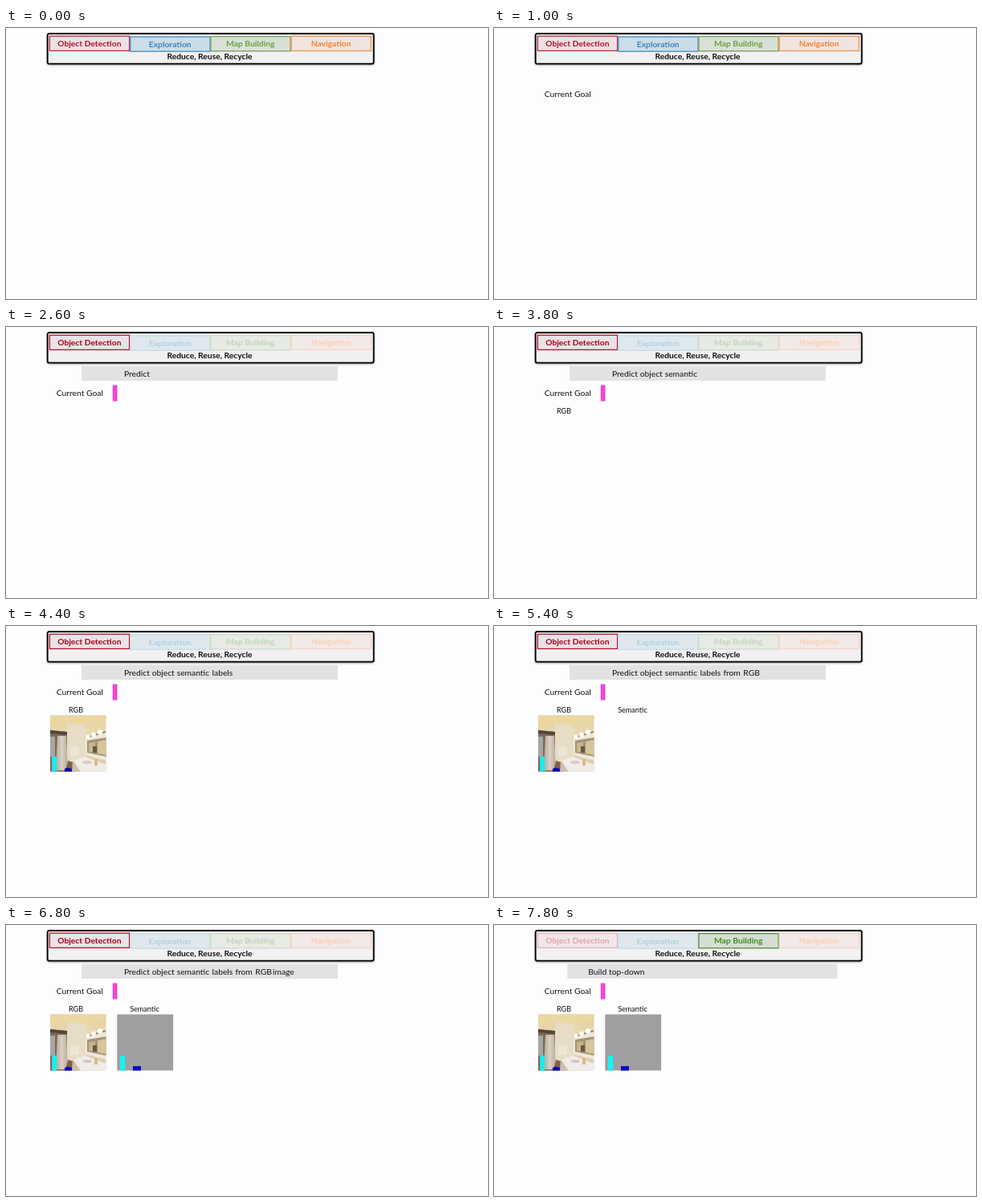
Animation, 600 px wide and 338 px high, one loop 8 s. Source, as an HTML page:

```html
<!DOCTYPE html>
<html lang="en">
<head>
<meta charset="utf-8">
<title>Object search pipeline</title>
<style>
  html, body { margin: 0; width: 100%; height: 100%; overflow: hidden; background: #fdfcfe; }
  svg { display: block; width: 100vw; height: 100vh; }
  text { font: 10.3px Lato, sans-serif; fill: #111; }
  .bold { font-weight: 700; }
  .mid { text-anchor: middle; }
  .label { font-size: 9.1px; }
</style>
</head>
<body>
<svg viewBox="0 0 600 338">
  <defs>
    <filter id="shadow" x="-5%" y="-20%" width="110%" height="150%">
      <feDropShadow dx="0" dy="1" stdDeviation="1" flood-color="#000" flood-opacity=".4"/>
    </filter>
    <filter id="glow"><feGaussianBlur stdDeviation=".7"/></filter>
    <linearGradient id="wall" x2="0" y2="1">
      <stop offset="0" stop-color="#e6d09a"/>
      <stop offset=".35" stop-color="#e9d9b4"/>
      <stop offset="1" stop-color="#d8c8b2"/>
    </linearGradient>
    <linearGradient id="curtain">
      <stop offset="0" stop-color="#b5a797"/>
      <stop offset=".5" stop-color="#d9d0c4"/>
      <stop offset="1" stop-color="#b9ab9c"/>
    </linearGradient>
    <linearGradient id="magenta">
      <stop offset="0" stop-color="#d936c4"/>
      <stop offset=".4" stop-color="#fb4be6"/>
      <stop offset="1" stop-color="#dc38c8"/>
    </linearGradient>
    <clipPath id="photoClip"><rect x="55" y="111.5" width="69.5" height="70"/></clipPath>
  </defs>

  <rect x="51.7" y="7" width="406" height="37.6" rx="2" fill="#f2f0f2" stroke="#000" stroke-width="1.8" filter="url(#shadow)"/>
  <g id="tabs"></g>
  <text class="bold mid" x="253.5" y="38.5" fill="#000">Reduce, Reuse, Recycle</text>

  <rect data-from="2600" data-to="7200" x="94" y="48.7" width="319" height="18.3" fill="#e4e1e5"/>
  <rect data-from="7200" x="91.3" y="48.4" width="336.2" height="18.3" fill="#e4e1e5"/>
  <g id="words"></g>

  <text data-from="600" x="62.8" y="85.7">Current Goal</text>
  <rect data-from="1600" x="132.8" y="72.4" width="5.6" height="20.2" rx=".6" fill="url(#magenta)"/>
  <text data-from="3400" class="label mid" x="87" y="107.9">RGB</text>
  <text data-from="5000" class="label mid" x="172.5" y="107.9">Semantic</text>

  <g data-from="4400" clip-path="url(#photoClip)">
    <rect x="55" y="111" width="70" height="71" fill="url(#wall)"/>
    <path d="M55 111H125V117L100 124L76 121L55 127Z" fill="#ead7a2"/>
    <path d="M76 121L100 124V170H76Z" fill="#e7dcc5"/>
    <path d="M55 130L76 132V182H55Z" fill="#806a54"/>
    <path d="M55 130L76 132V136L55 134Z" fill="#51463f"/>
    <path d="M64 137L75 137L77 180H62Z" fill="url(#curtain)"/>
    <path d="M55 138H61V163H55Z" fill="#a3a6a4"/>
    <path d="M99 140L125 134V168L99 161Z" fill="#efe8da"/>
    <path d="M101 143L125 139V163L101 158Z" fill="#a39378"/>
    <path d="M103 146L111 145V158L103 157Z" fill="#c8b78e"/>
    <path d="M114 144L125 142V161L114 159Z" fill="#d6c59c"/>
    <path d="M108 150H113V158H108Z" fill="#665941"/>
    <path d="M80 150H91V162H80Z" fill="#eee5d2"/>
    <path d="M100 139L124 132" stroke="#81796d" stroke-width="1.6"/>
    <g fill="#fffdf4" filter="url(#glow)">
      <circle cx="102" cy="138" r="2.5"/><circle cx="109" cy="135.5" r="2.9"/><circle cx="117" cy="132.5" r="3.2"/>
    </g>
    <path d="M77 168L87 171V182H74Z" fill="#7f6249"/>
    <path d="M83 168L98 163L125 173V182H93Z" fill="#f0ece7"/>
    <path d="M83 168L93 182H82Z" fill="#cdbfae"/>
    <ellipse cx="101" cy="170" rx="6" ry="2.2" fill="#d4ccc3"/>
    <path d="M110 166H114V174H110Z" fill="#d7bb86"/>
    <rect x="57.2" y="163" width="6" height="19" fill="#18eef2"/>
    <path d="M73 182V178L76 176.7L82 178V182Z" fill="#0808b8"/>
  </g>

  <g data-from="6200">
    <rect x="138.3" y="111.5" width="69.8" height="70" fill="#a09ea0"/>
    <rect x="142" y="163" width="6.2" height="18.5" fill="#12f4f6"/>
    <rect x="158" y="176" width="10" height="5.5" fill="#0505c8"/>
  </g>
</svg>
<script>
const LOOP = 8000;
const svgNS = 'http://www.w3.org/2000/svg';

function add(parent, tag, attrs, text = '') {
  const el = document.createElementNS(svgNS, tag);
  for (const [key, value] of Object.entries(attrs)) el.setAttribute(key, value);
  el.textContent = text;
  parent.append(el);
  return el;
}

// Each look is [fill, stroke, text].
const tabSpecs = [
  { name: 'Object Detection', x: 54.4, y: 10.2, base: 23.2,
    normal: ['#eee1e4', '#b92c43', '#b80f26'], active: ['#eae3e7', '#b5142c', '#b00018'], faded: ['#f0e7ea', '#e9b1b9', '#e3a0a9'] },
  { name: 'Exploration', x: 154.8, y: 11, base: 23.8,
    normal: ['#cbdde9', '#4c8abf', '#3c83bf'], active: ['#cbdde9', '#4c8abf', '#3c83bf'], faded: ['#e0e8ed', '#c3dce8', '#aed0e3'] },
  { name: 'Map Building', x: 254.9, y: 10.6, base: 23.4,
    normal: ['#d9e1d6', '#75a458', '#68a343'], active: ['#d6ddd3', '#53913a', '#3f8e20'], faded: ['#e8ebe5', '#cddcc7', '#c2d4ba'] },
  { name: 'Navigation', x: 355.2, y: 10.3, base: 23.2,
    normal: ['#f1e4de', '#f2944f', '#f5842f'], active: ['#f1e4de', '#f2944f', '#f5842f'], faded: ['#f2eae8', '#f9d4c0', '#fbcdb3'] },
];

const tabGroup = document.querySelector('#tabs');
const tabs = tabSpecs.map(spec => ({
  spec,
  box: add(tabGroup, 'rect', { x: spec.x, y: spec.y, width: 99.2, height: 18.2, 'stroke-width': 1.3 }),
  title: add(tabGroup, 'text', { x: spec.x + 49.4, y: spec.base, class: 'bold mid' }, spec.name),
}));

// Captions appear word by word: [text, x, from, to].
const words = [
  ['Predict', 147, 2600, 7200], ['object', 181.7, 3000, 7200], ['semantic', 212.7, 3600, 7200],
  ['labels', 256.6, 4200, 7200], ['from', 285.4, 4800, 7200], ['RGB', 310.3, 5400, 7200],
  ['image', 332, 6000, 7200], ['Build', 117.3, 7200, LOOP], ['top-down', 143.1, 7800, LOOP],
];
const wordGroup = document.querySelector('#words');
for (const [text, x, from, to] of words) {
  add(wordGroup, 'text', { x, y: 61.5, 'data-from': from, 'data-to': to }, text);
}

const timed = [...document.querySelectorAll('[data-from]')].map(el => ({
  el, from: +el.dataset.from, to: +(el.dataset.to || LOOP),
}));

function draw(time) {
  const activeTab = time < 2600 ? null : time < 7200 ? 'Object Detection' : 'Map Building';
  for (const { spec, box, title } of tabs) {
    const look = !activeTab ? 'normal' : spec.name === activeTab ? 'active' : 'faded';
    const [fill, stroke, ink] = spec[look];
    box.style.fill = fill;
    box.style.stroke = stroke;
    title.style.fill = ink;
  }
  for (const { el, from, to } of timed) {
    el.style.visibility = time >= from && time < to ? 'visible' : 'hidden';
  }
}

const start = performance.now();
function tick() {
  draw((performance.now() - start) % LOOP);
  requestAnimationFrame(tick);
}
tick();
</script>
</body>
</html>
```
